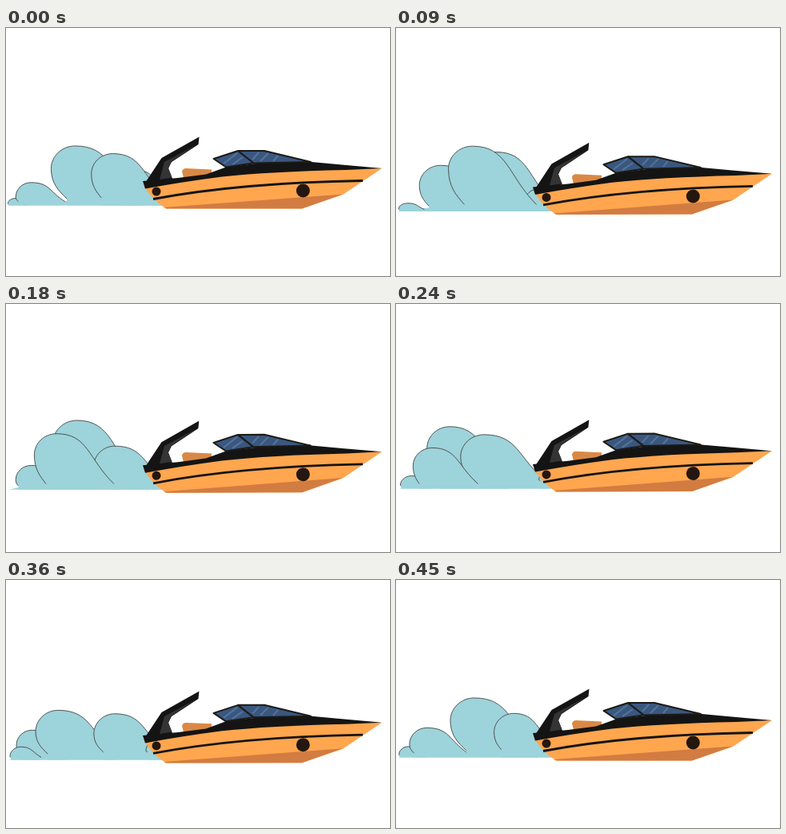
Write an HTML page that moves like this. It is 480 by 311 pixels and loops after 0.48 s.

```html
<!DOCTYPE html>
<html lang="en">
<head>
<meta charset="utf-8">
<title>Speedboat</title>
<style>
html, body { margin: 0; width: 100%; height: 100%; overflow: hidden; background: #fff; }
svg { display: block; width: 100vw; height: 100vh; }
.fill { fill: #9dd3da; }
.line { fill: none; stroke: #444; stroke-width: .9; }
</style>
</head>
<body>
<svg viewBox="0 0 480 311">
  <g id="scene">
    <g id="foam"><path class="fill" d="M4 222.500L19 219L200 212V222.500Z"/></g>
    <g id="boat">
      <path fill="#d98945" d="M222 188L220 180Q221 176 225 176L257 177.500V186Z"/>
      <path fill="#ffa64f" d="M172 197Q181 214 200 226.500H370L421 209L470 176L340 178L230 188Z"/>
      <path fill="#d27c42" d="M197 225L421 208.500L370 226.500H201Z"/>
      <path fill="none" stroke="#141414" stroke-width="2.800" d="M184 214.500Q293 194 446 191.500"/>
      <path fill="#141414" d="M171 192L215 188L250 183.500L275 174.500L320 169L382 168L420 171.500L470 176L425 178Q330 180 270 186.500Q220 193 174 201.500Z"/>
      <path fill="#141414" d="M174 194L194.500 163L241.500 136.500L240.500 146L207 168L203 176L208 189Z"/>
      <path fill="#343434" d="M238 146.500L206.500 167.500L203 176L207.500 187.500L192 190L198 168Z"/>
      <path fill="#3a5780" stroke="#1c1a14" stroke-width="2" stroke-linejoin="round" d="M259.500 164L290 154H323L381 168L309 169.500L275 174.500Z"/>
      <path fill="none" stroke="#567399" stroke-width="2" d="M272 170L289 157M283 171L296 162M308 165L316 156M318 167L328 157M334 167L340 160"/>
      <path fill="none" stroke="#1c1a14" stroke-width="2.200" d="M290 154L309 169"/>
      <circle fill="#24170f" cx="371.300" cy="204" r="8.500"/>
      <circle fill="#24170f" cx="188" cy="205" r="5.500"/>
    </g>
  </g>
</svg>
<script>
const LOOP = 480, STEP = 30, WATER = 222.5;
const LIFE = 570, PEAK = 225, SPREAD = 205;
const $ = id => document.getElementById(id);

function addPath(cls) {
  const p = document.createElementNS("http://www.w3.org/2000/svg", "path");
  p.setAttribute("class", cls);
  return $("foam").appendChild(p);
}

// A puff outlives one loop, so each has a second, older copy.
const puffs = [
  { birth: -54, height: 87 },
  { birth: 60, height: 71 },
  { birth: 240, height: 75 },
  { birth: 354, height: 82 }
].flatMap(p => [LOOP, 0].map(lag => ({
  birth: p.birth - lag, height: p.height, fill: addPath("fill"), line: addPath("line")
})));

// The puff drifts left, slowing down, while it swells and sinks again.
function shape(age, height) {
  const s = age / LIFE;
  const swell = Math.exp(-(((age - PEAK) / SPREAD) ** 2));
  const x = 10 + 185 * (1 - s) ** 1.62;
  const y = WATER - height * swell;
  const left = x - 30 * Math.sqrt(swell);
  const tail = left + 20 * swell ** 2;
  const foot = 212.5 + 9.5 * s * s;
  const end = Math.min(200, x + 80 * swell ** .7);
  return { x, y, left, tail, foot, end };
}

function curve({ x, y, left, tail, foot, end }) {
  const mid = Math.min(y + (x - left) * .95, foot - 1);
  const bend = x + (end - x) * .55;
  return `M${tail} ${foot}` +
    `C${(tail + left) / 2} ${foot - (foot - mid) * .25} ${left} ${(mid + foot) / 2} ${left} ${mid}` +
    `C${left} ${mid - (mid - y) * .55} ${x - (x - left) * .55} ${y} ${x} ${y}` +
    `C${bend} ${y} ${bend} ${(y + foot) / 2} ${end} ${foot}`;
}

function draw(t) {
  const bob = 10.3 * Math.max(0, Math.sin(Math.PI * (t / 450) ** .736)) ** 1.6;
  $("scene").setAttribute("transform", `translate(0 ${bob})`);
  $("boat").setAttribute("transform", `rotate(${-.018 * bob} 172 200)`);
  for (const { birth, height, fill, line } of puffs) {
    const age = t - birth;
    const p = age >= 0 && age <= LIFE ? shape(age, height) : null;
    const d = p ? curve(p) : "";
    line.setAttribute("d", d);
    fill.setAttribute("d", p ? `${d}V${WATER}H${p.tail}Z` : "");
  }
}

const start = performance.now();
function tick() {
  const t = (performance.now() - start) % LOOP;
  draw(Math.floor(t / STEP) * STEP);
  requestAnimationFrame(tick);
}
tick();
</script>
</body>
</html>
```
